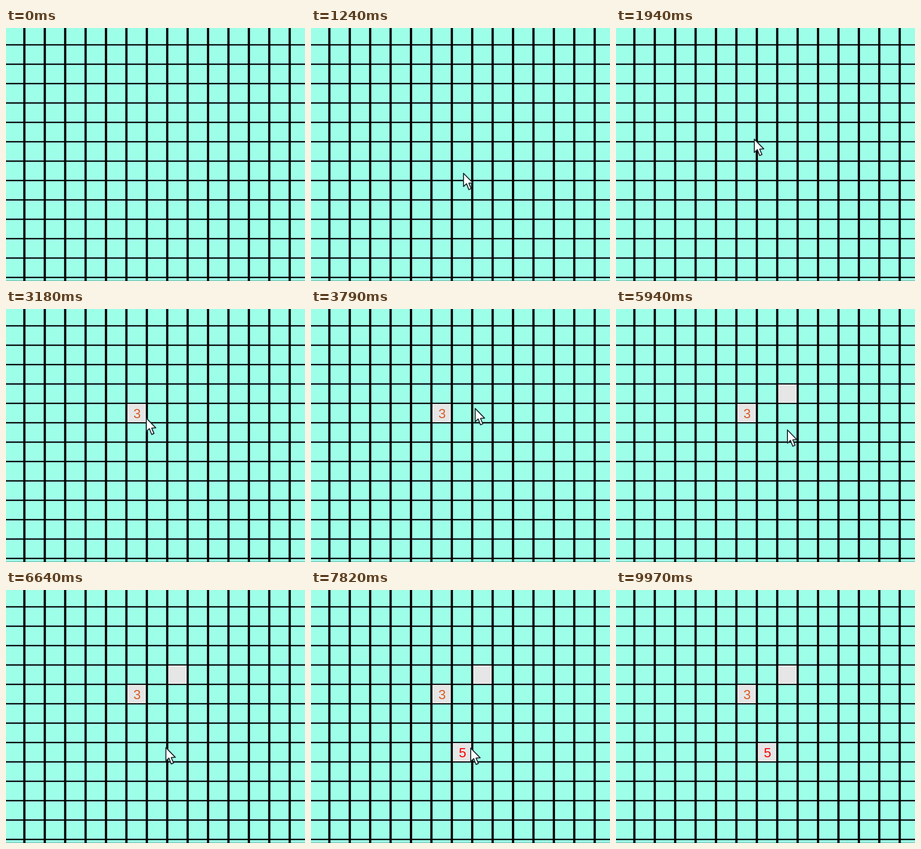
Recreate the animation shown at these times as an HTML page with a canvas. Size 586 by 496 pixels, loop 10 s.

```html
<!DOCTYPE html>
<html lang="en">
<head>
<meta charset="utf-8">
<title>Minefield</title>
<style>
  html, body { margin: 0; width: 100%; height: 100%; overflow: hidden; }
  canvas { display: block; }
</style>
</head>
<body>
<canvas id="stage" width="586" height="496"></canvas>
<script>
const ctx = document.getElementById('stage').getContext('2d');
const W = 586, H = 496, LOOP = 10000;
const PITCH_X = 40, PITCH_Y = 38, CELL = 36;
const COLORS = { closed: '#9effe9', pressed: '#66bdab', open: '#e6e6e6' };

// Cells that get clicked: grid position, press and release times.
const clicks = [
  { col: 6, row: 5, press: 2260, open: 2390, label: '3', color: '#d9602a' },
  { col: 8, row: 4, press: 4610, open: 4740 },
  { col: 7, row: 8, press: 6860, open: 6990, label: '5', color: '#ff0000' }
];

// Pointer waypoints: time, x, y.
const path = [
  [550, 409, 492], [1240, 298, 283], [1550, 271, 245], [2100, 270, 212],
  [2940, 270, 212], [3180, 274, 212], [3940, 330, 188], [4350, 343, 178],
  [5080, 343, 178], [5940, 335, 235], [6010, 334, 241], [6700, 312, 308],
  [9450, 312, 308], [9580, 400, 313], [9700, 545, 327]
];

function slope(i, k) {
  const a = path[i], b = path[i + 1];
  return a && b ? (b[k] - a[k]) / (b[0] - a[0]) : null;
}

// Monotone tangent, so that the pointer never overshoots a waypoint.
function tangent(i, k) {
  const before = slope(i - 1, k), after = slope(i, k);
  if (before === null) return after;
  if (after === null) return before;
  return before * after <= 0 ? 0 : 2 * before * after / (before + after);
}

function pointerAt(t) {
  if (t < path[0][0] || t >= path[path.length - 1][0]) return null;
  const i = path.findIndex((p, n) => n < path.length - 1 && t < path[n + 1][0]);
  const a = path[i], b = path[i + 1], span = b[0] - a[0], u = (t - a[0]) / span;
  return [1, 2].map(k => {
    const v = 1 - u;
    return a[k] * (1 + 2 * u) * v * v + b[k] * u * u * (3 - 2 * u)
      + span * u * v * (tangent(i, k) * v - tangent(i + 1, k) * u);
  });
}

function rect(color, x, y, w, h) {
  ctx.fillStyle = color;
  ctx.fillRect(x, y, w, h);
}

function drawCell(col, row, color, shaded) {
  const x = col * PITCH_X - 2, y = row * PITCH_Y - 4;
  rect(color, x, y, CELL, CELL);
  if (!shaded) return;
  rect('rgba(0,0,0,.3)', x, y, CELL, 1);
  rect('rgba(0,0,0,.3)', x, y + CELL - 1, CELL, 1);
  rect('rgba(0,0,0,.2)', x, y, 1, CELL);
  rect('rgba(0,0,0,.2)', x + CELL - 1, y, 1, CELL);
}

function drawBoard(t) {
  rect('#000', 0, 0, W, H);
  for (let row = 0; row <= 13; row++) {
    for (let col = 0; col <= 14; col++) drawCell(col, row, COLORS.closed, true);
  }
  rect('rgba(0,0,0,.35)', 0, H - 1, W, 1);

  ctx.font = '26px "Liberation Sans", Arial, sans-serif';
  ctx.textAlign = 'center';
  for (const c of clicks) {
    if (t < c.press) continue;
    const opened = t >= c.open;
    drawCell(c.col, c.row, opened ? COLORS.open : COLORS.pressed, false);
    if (opened && c.label) {
      ctx.fillStyle = c.color;
      ctx.fillText(c.label, c.col * PITCH_X + 17, c.row * PITCH_Y + 24);
    }
  }
}

function drawPointer(x, y) {
  ctx.save();
  ctx.translate(x, y);
  ctx.beginPath();
  ctx.moveTo(1, 2);
  ctx.lineTo(1, 28);
  ctx.lineTo(7, 22.5);
  ctx.lineTo(11.5, 34);
  ctx.lineTo(16, 32);
  ctx.lineTo(11.5, 21.5);
  ctx.lineTo(19.5, 21);
  ctx.closePath();
  ctx.fillStyle = '#fff';
  ctx.fill();
  ctx.lineWidth = 2;
  ctx.lineJoin = 'round';
  ctx.strokeStyle = '#1f2d30';
  ctx.stroke();
  ctx.restore();
}

function frame() {
  const t = performance.now() % LOOP;
  drawBoard(t);
  const pointer = pointerAt(t);
  if (pointer) drawPointer(...pointer);
  requestAnimationFrame(frame);
}
frame();
</script>
</body>
</html>
```
